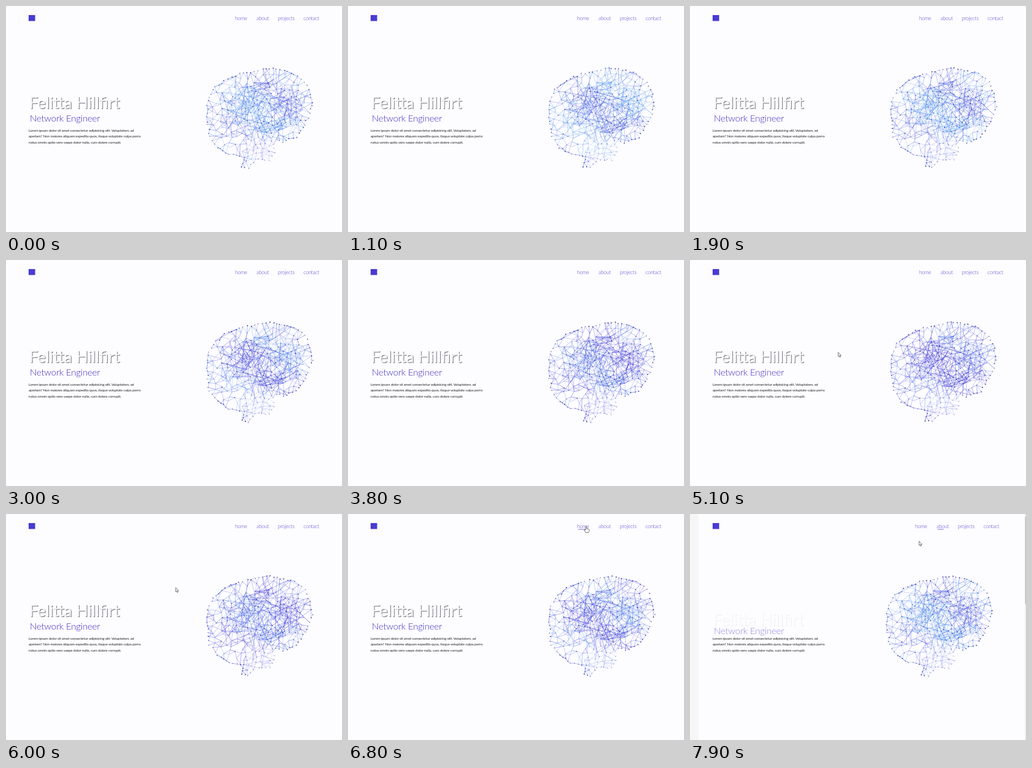
Animation of 594x399 px, one loop 8 s. Source, as an HTML page with a canvas:

```html
<!DOCTYPE html>
<html lang="en">
<head>
<meta charset="utf-8">
<title>Portfolio</title>
<style>
html, body { margin: 0; width: 100%; height: 100%; overflow: hidden; background: #fdfcff; }
canvas, svg { position: absolute; left: 0; top: 0; width: 594px; height: 399px; }
text { font-family: Lato, "Open Sans", sans-serif; font-weight: 300; }
#name { font-size: 28px; font-weight: 400; fill: #f6f5fa; filter: drop-shadow(1px 1px .7px rgba(0, 0, 0, .55)); }
#role { font-size: 16.5px; letter-spacing: -.3px; fill: #4130c0; }
#bio text { font-size: 6.4px; letter-spacing: -.15px; fill: #222; font-weight: 400; }
#nav text { font-size: 9px; letter-spacing: -.15px; fill: #4f3fc8; }
#nav rect { fill: #5a4ad0; }
#cursor path { fill: #fff; stroke: #333; stroke-width: .7; stroke-linejoin: round; }
</style>
</head>
<body>
<canvas id="brain"></canvas>
<svg viewBox="0 0 594 399">
  <g id="gutter">
    <rect width="15" height="399" fill="#f6f6f6"/>
    <rect x="592.5" width="1.5" height="399" fill="#ececec"/>
    <rect x="592.5" y="5" width="1.5" height="154" fill="#b8b8b8"/>
  </g>
  <rect x="40" y="16" width="11.5" height="10.5" fill="#4a3bd2"/>
  <g id="nav">
    <text x="405" y="25">home</text>
    <text x="443" y="25">about</text>
    <text x="480.5" y="25">projects</text>
    <text x="526" y="25">contact</text>
    <rect id="homeLine" x="407" y="26.7" height=".8"/>
    <rect id="aboutLine" x="444.5" y="26.7" height=".8"/>
  </g>
  <text id="name" x="41" y="181">Felitta Hillfirt</text>
  <text id="role" x="42" y="204">Network Engineer</text>
  <g id="bio">
    <text x="40" y="222">Lorem ipsum dolor sit amet consectetur adipisicing elit. Voluptatem, ad</text>
    <text x="40" y="232.3">aperiam? Non maiores aliquam expedita quos, itaque voluptate culpa porro</text>
    <text x="40" y="242.6">natus omnis optio vero saepe dolor nulla, cum dolore corrupti.</text>
  </g>
  <g id="cursor">
    <path id="arrow" d="M0 0V7.5L1.7 6L2.9 8.6L4.1 8L3 5.6H5.2Z"/>
    <path id="hand" d="M-1 .8Q0-.4 1 .8V4.2Q2 3.6 2.6 4.4Q3.8 4 4.2 4.9Q5.2 4.8 5.4 5.8V7.6Q5 9.6 4.2 10.8H-1Q-1.6 9-3.2 7.2Q-4 5.4-2.4 5.4L-1 6.6Z"/>
  </g>
</svg>
<script>
const W = 594, H = 399, LOOP = 8000, TAU = Math.PI * 2;
const $ = id => document.getElementById(id);
const canvas = $('brain'), ctx = canvas.getContext('2d');
const dpr = window.devicePixelRatio || 1;
canvas.width = W * dpr;
canvas.height = H * dpr;

const clamp = v => Math.max(0, Math.min(1, v));
const lerp = (a, b, k) => a + (b - a) * k;

let seed = 4127;
function rand() {
  seed = (seed + 0x6D2B79F5) | 0;
  let r = Math.imul(seed ^ (seed >>> 15), 1 | seed);
  r = (r + Math.imul(r ^ (r >>> 7), 61 | r)) ^ r;
  return ((r ^ (r >>> 14)) >>> 0) / 4294967296;
}

const outline = [
  [355, 190], [357, 168], [366, 148], [386, 131], [412, 120], [440, 115], [460, 110],
  [485, 113], [510, 119], [528, 134], [538, 155], [541, 176], [534, 198], [526, 214],
  [513, 231], [490, 241], [477, 236], [468, 225], [475, 258], [466, 272], [441, 271],
  [429, 286], [416, 283], [421, 266], [395, 263], [374, 250], [360, 230], [357, 210]
];
const shape = new Path2D();
outline.forEach(([x, y]) => shape.lineTo(x, y));
shape.closePath();
const inside = (x, y) => ctx.isPointInPath(shape, x, y);
const isStem = (x, y) => y > 228 && x > 424 && x < 477;
const core = (x, y) => Math.hypot((x - 457) / 66, (y - 180) / 46) < 1;

const nodes = [], edges = [];
const dist = (a, b) => Math.hypot(a.x - b.x, a.y - b.y);

function addNode(x, y, rim) {
  nodes.push({ x, y, rim, a: rand() * TAU, b: rand() * TAU, r: .45 + rand() * .4, dot: rim || rand() < .4 });
}

function buildNodes() {
  outline.forEach(([x, y], i) => {
    const [nx, ny] = outline[(i + 1) % outline.length];
    const n = Math.max(1, Math.round(Math.hypot(nx - x, ny - y) / 7));
    for (let k = 0; k < n; k++) {
      addNode(lerp(x, nx, k / n) + rand() * 2 - 1, lerp(y, ny, k / n) + rand() * 2 - 1, true);
    }
  });
  for (let i = 0; i < 7000; i++) {
    const p = { x: 354 + rand() * 188, y: 109 + rand() * 178 };
    const gap = core(p.x, p.y) ? 6.2 : isStem(p.x, p.y) ? 6 : 8;
    if (inside(p.x, p.y) && nodes.every(q => dist(p, q) > gap)) addNode(p.x, p.y, false);
  }
}

function buildEdges() {
  const seen = new Set();
  const link = (i, j) => {
    const p = nodes[i], q = nodes[j];
    const key = Math.min(i, j) * 1000 + Math.max(i, j);
    const mx = (p.x + q.x) / 2, my = (p.y + q.y) / 2;
    if (seen.has(key) || !inside(mx, my)) return;
    seen.add(key);
    const faint = isStem(mx, my) ? .5 : 1;
    edges.push({ p, q, mx, my, tint: rand(), alpha: (.35 + rand() * .5) * faint });
  };
  nodes.forEach((p, i) => {
    const near = nodes.map((q, j) => ({ j, d: dist(p, q) }))
      .filter(o => o.j !== i && o.d < 46)
      .sort((a, b) => a.d - b.d);
    near.slice(0, p.rim ? 3 : 4).forEach(o => { if (o.d < 20 && rand() < .85) link(i, o.j); });
    const extra = core(p.x, p.y) ? 2 : rand() < .45 ? 1 : 0;
    for (let k = 0; k < extra; k++) {
      const reach = core(p.x, p.y) ? near.length : near.length * .4;
      if (near.length) link(i, near[Math.floor(rand() * reach)].j);
    }
  });
}

function drawBrain(t, shift) {
  const s = t / 1000;
  const glow = Math.cos(TAU * (t - 1000) / LOOP);
  ctx.setTransform(dpr, 0, 0, dpr, 0, 0);
  ctx.clearRect(0, 0, W, H);
  ctx.translate(shift, 0);
  for (const n of nodes) {
    n.px = n.x + Math.sin(s * TAU / 4 + n.a) * 1.1;
    n.py = n.y + Math.sin(s * TAU / 4 + n.b) * 1.1;
  }
  ctx.lineWidth = .55;
  for (const e of edges) {
    const wave = Math.sin(e.mx * .035 - e.my * .05 + e.tint * 3.5 - s * TAU / 2);
    const c = clamp(.32 + glow * .2 + wave * .35);
    const rgb = [lerp(48, 70, c), lerp(38, 178, c), lerp(208, 245, c)].map(Math.round);
    ctx.strokeStyle = `rgba(${rgb},${e.alpha})`;
    ctx.beginPath();
    ctx.moveTo(e.p.px, e.p.py);
    ctx.lineTo(e.q.px, e.q.py);
    ctx.stroke();
  }
  for (const n of nodes) {
    if (!n.dot) continue;
    ctx.fillStyle = isStem(n.x, n.y) ? 'rgba(50,50,160,.6)' : 'rgba(28,28,130,.9)';
    ctx.beginPath();
    ctx.arc(n.px, n.py, n.r + (n.rim ? .15 : 0), 0, TAU);
    ctx.fill();
  }
}

// time, x, y of the pointer tip
const path = [
  [4700, 250, 186], [5100, 262, 163], [5600, 270, 158], [6000, 300, 130], [6500, 414, 30],
  [6800, 421, 22], [7000, 422, 22], [7300, 450, 23], [7600, 449, 23], [7900, 405, 48], [8000, 396, 54]
];

function drawCursor(t) {
  const i = path.findIndex(k => k[0] > t);
  const shown = i > 0;
  $('cursor').style.display = shown ? '' : 'none';
  if (!shown) return;
  const [t0, x0, y0] = path[i - 1], [t1, x1, y1] = path[i];
  const k = (t - t0) / (t1 - t0);
  const hover = (t >= 6600 && t < 7100) || (t >= 7200 && t < 7700);
  $('cursor').setAttribute('transform', `translate(${lerp(x0, x1, k)} ${lerp(y0, y1, k)})`);
  $('hand').style.display = hover ? '' : 'none';
  $('arrow').style.display = hover ? 'none' : '';
}

function underline(id, t, on, off) {
  $(id).setAttribute('width', 18 * (clamp((t - on) / 300) - clamp((t - off) / 300)));
}

function leave(id, t, start) {
  const k = clamp((t - start) / 450);
  $(id).setAttribute('transform', `translate(0 ${18 * k})`);
  $(id).style.opacity = 1 - k;
}

function render(t) {
  const leaving = t >= 7600;
  drawBrain(t, leaving ? -7.5 : 0);
  $('gutter').style.display = leaving ? '' : 'none';
  $('nav').setAttribute('transform', `translate(${leaving ? -7 : 0} 0)`);
  underline('homeLine', t, 6500, 7050);
  underline('aboutLine', t, 7200, 7780);
  leave('name', t, 7500);
  leave('role', t, 7700);
  drawCursor(t);
}

// the picture advances in 100 ms steps, with a short hold near the start
function step(ms) {
  const t = Math.floor((ms % LOOP) / 100) * 100;
  return t < 200 ? 0 : t < 600 ? 200 : t;
}

buildNodes();
buildEdges();
const begin = performance.now();
let last = -1;
function tick() {
  const t = step(performance.now() - begin);
  if (t !== last) render(last = t);
  requestAnimationFrame(tick);
}
tick();
</script>
</body>
</html>
```
